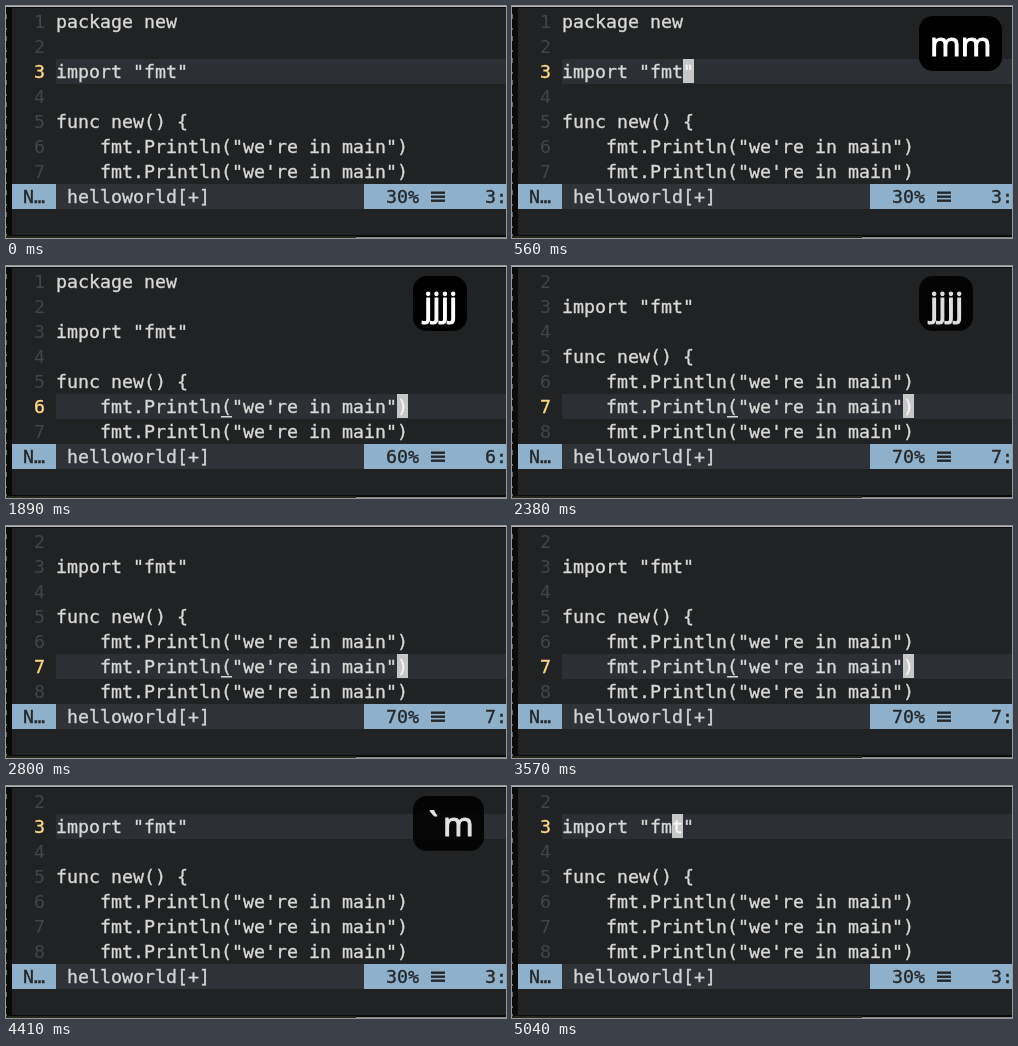
These frames come from a looping animation (500x232 px, 5.11 s). An HTML page:

```html
<!DOCTYPE html>
<html lang="en">
<head>
<meta charset="utf-8">
<title>Vim marks</title>
<style>
  html, body { margin: 0; width: 100%; height: 100%; overflow: hidden; background: #0b0b0b; }
  svg { display: block; width: 500px; height: 232px; }
  text { font: 18.27px "DejaVu Sans Mono", "Noto Sans Mono", monospace; white-space: pre; stroke-width: .35px; }
  .key { font: 33px "Open Sans", "Noto Sans", sans-serif; stroke-width: 1.2px; }
</style>
</head>
<body>
<svg id="stage" viewBox="0 0 500 232"></svg>
<script>
const LOOP = 5110, TICK = 70, CELL = 11, ROW = 25, LEFT = 50;
const call = '    fmt.Println("we\'re in main")';
const lines = ['package new', '', 'import "fmt"', '', 'func new() {', call, call, call];

// time, cursor line, cursor column, lines scrolled off
const moves = [
  [0, 3, 11, 0], [1330, 4, 0, 0], [1540, 5, 11, 0],
  [1750, 6, 31, 0], [1960, 7, 31, 1], [3990, 3, 10, 1]
];
const keys = [
  [70, 'm'], [210, 'mm'],
  [1260, 'j'], [1470, 'jj'], [1680, 'jjj'], [1890, 'jjjj'],
  [3710, '`'], [3920, '`m']
];
const keyWidth = { m: 30.5, j: 8, '`': 18.5 };
const cursorOff = [[0, 70], [700, 1260], [2940, 3570], [4130, 4760]];
const HOLD = 490, FADE = 490;

const latest = (list, t) => list.filter(e => e[0] <= t).pop();
const colX = col => LEFT + col * CELL;
const rowY = row => 3 + row * ROW;
const rect = (x, y, w, h, fill, more = '') =>
  `<rect x="${x}" y="${y}" width="${w}" height="${h}" fill="${fill}" ${more}/>`;
const text = (s, col, row, fill, stroke = fill) =>
  `<text x="${colX(col)}" y="${rowY(row) + 19}" fill="${fill}" stroke="${stroke}">${s}</text>`;

function editor(t) {
  const [, line, col, top] = latest(moves, t);
  const row = line - 1 - top;
  let out = rect(LEFT, rowY(row), 450, ROW, '#2c2f34');
  for (let r = 0; r < 7; r++) {
    const n = r + top + 1;
    out += n === line ? text(n, -2, r, '#ffd98a') : text(n, -2, r, '#424548', 'none');
    out += text(lines[n - 1], 0, r, '#d8d9d6');
  }
  // matching bracket
  if (col === 31) out += rect(colX(15), rowY(row) + 22, CELL, 1.5, '#d8d9d6');
  if (!cursorOff.some(([a, b]) => t >= a && t < b)) {
    out += rect(colX(col), rowY(row), CELL, ROW - 1, '#c6c7c6');
    out += text(lines[line - 1][col] || '', col, row, '#f6f6f6');
  }
  return out + status(line);
}

function status(line) {
  const y = rowY(7), blue = '#8fb0cb', ink = '#25282b';
  let out = rect(6, y, 44, ROW, blue) + rect(50, y, 308, ROW, '#2f3338') + rect(358, y, 142, ROW, blue);
  out += text('N…', -3, 7, ink) + text('helloworld[+]', 1, 7, '#d3d5d6');
  out += text(line * 10 + '%', 30, 7, ink) + text(line + ':', 39, 7, ink);
  for (let i = 0; i < 3; i++) out += rect(425, y + 7.5 + i * 4, 14, 2.4, ink);
  return out;
}

function popup(t) {
  const key = latest(keys, t);
  if (!key) return '';
  const [start, typed] = key, age = t - start - HOLD;
  const alpha = age < 0 ? 1 : 1 - (age + TICK) / FADE;
  if (alpha <= 0.01) return '';
  const width = [...typed].reduce((sum, c) => sum + keyWidth[c], 22);
  return `<g opacity="${alpha}">${rect(407, 10, width, 55, '#000', 'rx="14"')}` +
    `<text class="key" x="418" y="49.5" fill="#fff" stroke="#fff">${typed}</text></g>`;
}

const stage = document.getElementById('stage');
// window with slivers of the desktop along its edges
const frame = rect(0, 0, 500, 232, '#0b0b0b') + rect(0, 0, 500, 1, '#b4b4b4') +
  '<path d="M.5 8V230" stroke="#666" stroke-dasharray="5 9 2 6"/>' +
  rect(0, 230, 350, 2, '#25271c') + rect(350, 231, 150, 1, '#8a8a86') +
  rect(6, 2, 494, 227, '#202224');
let shown = -1;

function draw(now) {
  const t = Math.floor(now % LOOP / TICK) * TICK;
  if (t !== shown) {
    shown = t;
    stage.innerHTML = frame + editor(t) + popup(t);
  }
  requestAnimationFrame(() => draw(performance.now()));
}
draw(0);
</script>
</body>
</html>
```
